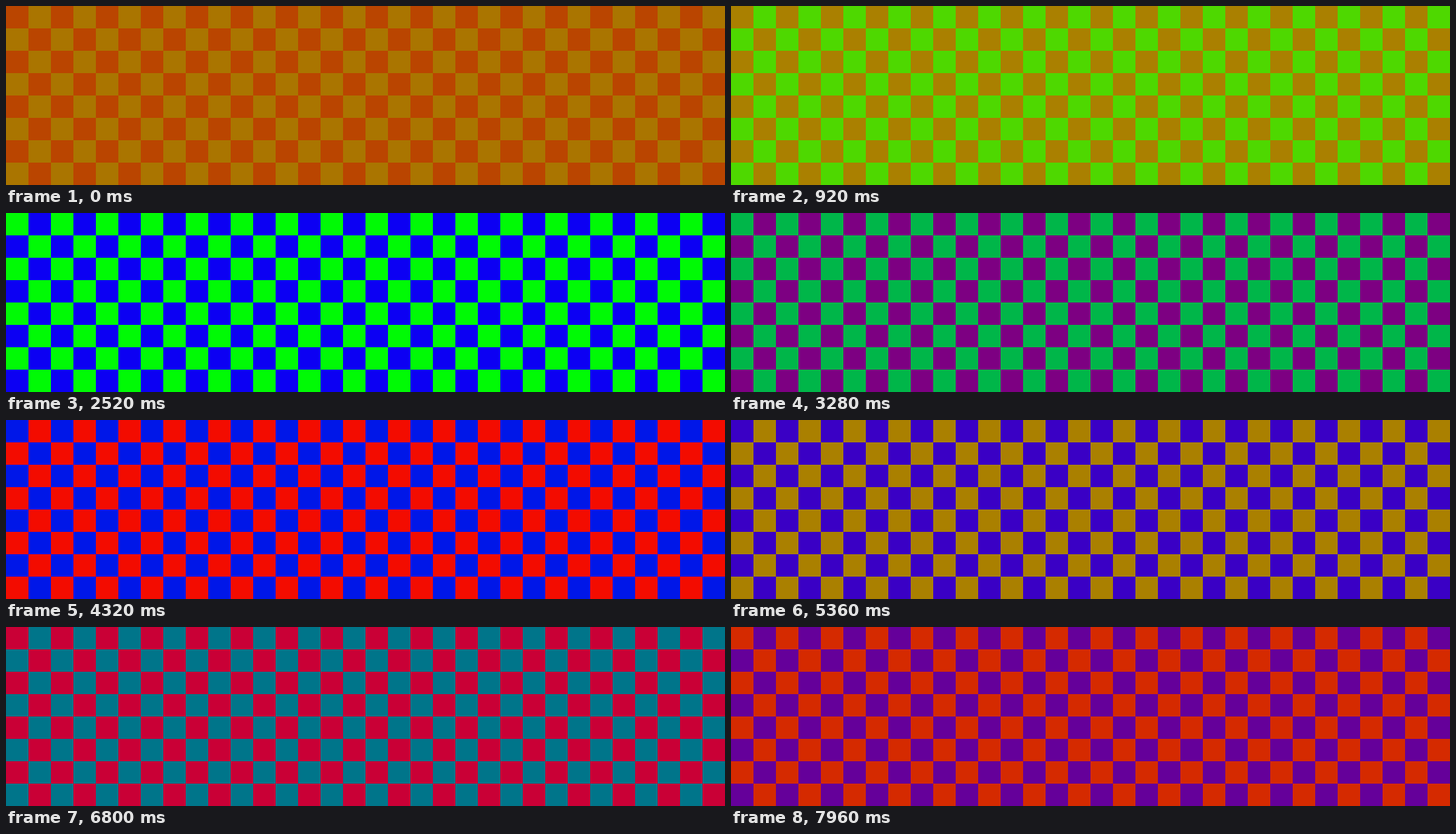
An HTML page with a canvas for the animation above (8000 ms loop, 1024 by 256 pixels).

```html
<!DOCTYPE html>
<html lang="en">
<head>
<meta charset="utf-8">
<title>Rainbow checkerboard</title>
<style>
  html, body { margin: 0; width: 100%; height: 100%; overflow: hidden; }
  canvas { display: block; }
</style>
</head>
<body>
<canvas id="stage" width="1024" height="256"></canvas>
<script>
const LOOP = 8000, CELL = 32, HOLD = 120;
const ctx = document.getElementById('stage').getContext('2d');

// The hue counter runs at an uneven pace: [ms, count]
const PACE = [[0, 0], [1800, 16], [3280, 32.6], [4320, 43.3], [5360, 52],
  [6800, 70], [7960, 82], [LOOP, 82]];

// Linear between the key points, repainted every HOLD ms
function counterAt(ms) {
  const i = PACE.findIndex(([t]) => t > ms);
  const [t0, n0] = PACE[i - 1], [t1, n1] = PACE[i];
  const held = Math.floor((ms - t0) / HOLD) * HOLD;
  return n0 + (n1 - n0) * held / (t1 - t0);
}

// LED rainbow in steps of thirds: red, orange, yellow, green, aqua, blue, purple, pink
const RED = [3, 2, 2, 0, 0, 0, 1, 2];
const GREEN = [0, 1, 2, 3, 2, 0, 0, 0];
const BLUE = [0, 0, 0, 0, 1, 3, 2, 1];

function rainbow(hue) {
  const pos = hue / 32, i = Math.floor(pos), part = pos - i;
  const mix = levels =>
    Math.round(85 * (levels[i % 8] * (1 - part) + levels[(i + 1) % 8] * part));
  return `rgb(${[RED, GREEN, BLUE].map(mix)})`;
}

function draw(ms) {
  const n = counterAt(ms);
  const colors = [rainbow(25.8 + 3 * n), rainbow(44 + 5 * n)];
  for (let y = 0; y < 8; y++) {
    for (let x = 0; x < 32; x++) {
      ctx.fillStyle = colors[(x + y) % 2];
      ctx.fillRect(x * CELL, y * CELL, CELL, CELL);
    }
  }
}

const start = performance.now();
function loop() {
  draw((performance.now() - start) % LOOP);
  requestAnimationFrame(loop);
}
loop();
</script>
</body>
</html>
```
